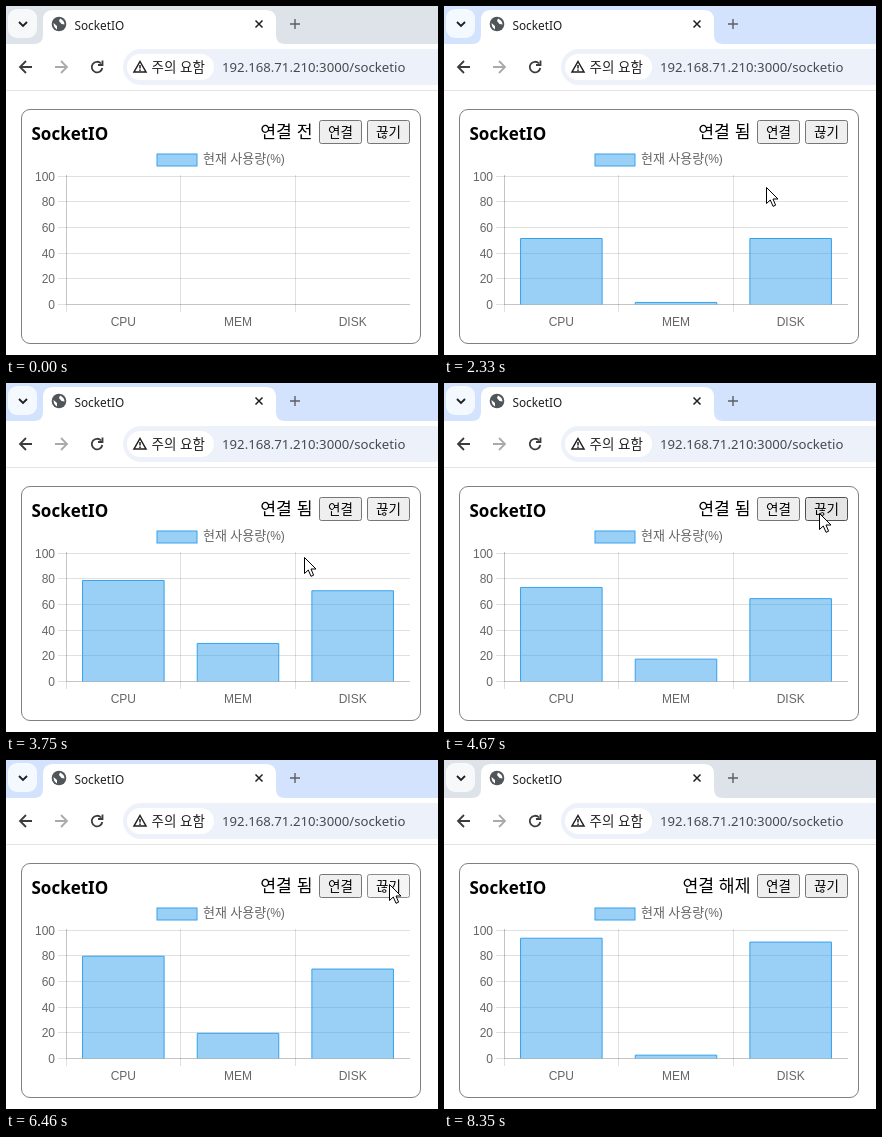
An HTML page that plays this animation: 432x349 px, repeating every 8450 ms.

```html
<!DOCTYPE html>
<html lang="ko">
<head>
<meta charset="utf-8">
<title>SocketIO</title>
<style>
html, body { margin: 0; width: 100%; height: 100%; overflow: hidden; background: #fff; }
svg { display: block; width: 100vw; height: 100vh; }
text { font-family: "Noto Sans", "Noto Sans CJK KR", sans-serif; }
.ko { font-family: "Noto Sans CJK KR", sans-serif; font-weight: 300; }
.chart text { font: 12px "Liberation Sans", "Noto Sans CJK KR", sans-serif; fill: #666; }
.chart .ko { font-size: 13px; }
.chart .tip text { fill: #fff; }
.icon { fill: none; stroke: #3c3c3c; stroke-width: 1.8; }
.blue { fill: rgba(54,162,235,.5); stroke: #36a2eb; }
.btn { fill: #efefef; stroke: #767676; }
.btn.hover { fill: #e5e5e5; stroke: #4f4f4f; }
.btn.down { fill: #f5f5f5; stroke: #8d8d8d; }
</style>
</head>
<body>
<svg viewBox="0 0 432 349">
  <!-- tab strip -->
  <rect id="strip" width="432" height="38"/>
  <rect x="2" y="3" width="29" height="29" rx="9" fill="#fff" opacity=".75"/>
  <path class="icon" d="M13 16l4 4 4-4" style="stroke:#1f1f1f"/>
  <path d="M28 38q9 0 9-9V14q0-10 10-10H260q10 0 10 10V29q0 9 9 9z" fill="#fff"/>
  <circle cx="53" cy="18" r="7.3" fill="#50555a"/>
  <path d="M47.500 17l3.500 3v3.500q-3.500-2-3.500-6.500zM54 12.500l-1 2.500 2.500 3 3 .5q0-4-4.500-6z" fill="#fff"/>
  <text x="68.500" y="23.500" font-size="11.8" fill="#1f1f1f">SocketIO</text>
  <path class="icon" d="M249.500 14.500l7 7m0-7l-7 7" style="stroke:#1f1f1f;stroke-width:1.5"/>
  <path class="icon" d="M284 18h10m-5-5v10" style="stroke:#5c5f62;stroke-width:1.4"/>

  <!-- toolbar -->
  <path class="icon" d="M26 61H14m6-6l-6 6 6 6"/>
  <path class="icon" d="M49 61H61m-6-6l6 6-6 6" style="stroke:#aaa"/>
  <path class="icon" d="M95 57.500a5.300 5.300 0 1 0 1.300 4.500M96.500 54.500v4.500h-4.500"/>
  <rect x="117" y="43" width="340" height="36" rx="18" fill="#edf1f9"/>
  <rect x="121" y="48" width="87" height="26" rx="13" fill="#fff"/>
  <path class="icon" d="M134 55.500l6 10.500h-12zM134 59v3.500m0 1v1.500" style="stroke:#1f1f1f;stroke-width:1.5"/>
  <text class="ko" x="145.500" y="65.500" font-size="13.5" fill="#1f1f1f">주의 요함</text>
  <text x="216" y="66" font-size="13.2" fill="#474a4e">192.168.71.210:3000/socketio</text>
  <path d="M0 84.500H432" stroke="#e4e4e4"/>

  <!-- card -->
  <rect x="15.500" y="103.500" width="399" height="234" rx="8.500" fill="#fff" stroke="#808080"/>
  <text x="25.500" y="133.500" font-size="17" font-weight="700">SocketIO</text>
  <text class="ko" id="status" x="306.500" y="132" font-size="17.2" text-anchor="end"></text>
  <rect class="btn" x="313.500" y="114.500" width="42" height="23" rx="2"/>
  <rect class="btn" x="361.500" y="114.500" width="42" height="23" rx="2"/>
  <g font-size="13.5" text-anchor="middle">
    <text class="ko" x="334.500" y="131">연결</text>
    <text class="ko" x="382.500" y="131">끊기</text>
  </g>

  <g class="chart">
    <rect class="blue" x="151" y="148" width="40" height="12"/>
    <text x="197" y="157"><tspan class="ko">현재</tspan> <tspan class="ko">사용량</tspan>(%)</text>
    <g id="grid"></g>
    <g id="bars"></g>
    <g class="tip" id="tip">
      <path d="M217 158H334q6 0 6 6V176l5.500 5.500-5.500 5.500V199q0 6-6 6H217q-6 0-6-6V164q0-6 6-6z" fill="rgba(0,0,0,.8)"/>
      <text x="217.500" y="175" style="font-weight:700">DISK</text>
      <rect x="217.500" y="185.500" width="12" height="12" fill="#9bd0f5" stroke="#36a2eb"/>
      <text x="232" y="195"><tspan class="ko">현재</tspan> <tspan class="ko">사용량</tspan>(%): 91</text>
    </g>
  </g>
  <path id="cursor" d="M.5.5V16.500L4.300 13 7 19.300 9.600 18.200 7 12H12z" fill="#fff" stroke="#000"/>
</svg>
<script>
const LOOP = 8450, FIRST = 1860, PERIOD = 670;
const LEFT = 60, RIGHT = 404, BASE = 298.5, UNIT = 1.285;
const SLOT = (RIGHT - LEFT) / 3, BAR = SLOT * .72;
const $ = id => document.getElementById(id);
const clamp = v => Math.max(0, Math.min(1, v));
const mix = (a, b, p) => a + (b - a) * p;
const within = (t, a, b) => t >= a && t < b;
const buttons = [...document.querySelectorAll('.btn')];

// successive readings of each bar
const usage = {
  CPU: [52, 88, 79, 80, 70, 72, 80, 94],
  MEM: [2, 25, 30, 5, 25, 10, 20, 3],
  DISK: [52, 75, 71, 70, 62, 57, 70, 91]
};
const names = Object.keys(usage);

// time, x, y where the pointer rests or turns
const path = [
  [40, 405, 350], [650, 329, 121], [1860, 326, 125], [2330, 322, 181],
  [3700, 297, 175], [4400, 373, 131], [5540, 386, 123], [6700, 383, 124],
  [7380, 366, 245], [7900, 386, 350]
];

function drawGrid() {
  let lines = '', labels = '';
  for (let v = 0; v <= 100; v += 20) {
    const y = Math.floor(BASE - v * UNIT) + .5;
    lines += `M52 ${y}H${RIGHT}`;
    labels += `<text x="49" y="${y + 4}" text-anchor="end">${v}</text>`;
  }
  names.forEach((name, i) => {
    const x = LEFT + i * SLOT;
    lines += `M${Math.floor(x) + .5} 169V306`;
    labels += `<text x="${x + SLOT / 2}" y="320" text-anchor="middle">${name}</text>`;
  });
  $('grid').innerHTML = `<path d="${lines}M60.5 169V298M60 298.5H404" fill="none" stroke="rgba(0,0,0,.12)"/>${labels}`;
  $('bars').innerHTML = '<path class="blue"/>'.repeat(names.length);
}

function pointer(t) {
  const next = path.findIndex(k => k[0] > t);
  const b = path.at(next), a = path[Math.max(0, next < 0 ? path.length - 1 : next - 1)];
  const p = clamp((t - a[0]) / (b[0] - a[0] || 1)), e = p * p * (3 - 2 * p);
  return [mix(a[1], b[1], e), mix(a[2], b[2], e)];
}

function reading(list, t) {
  const n = Math.min(list.length - 1, Math.floor((t - FIRST) / PERIOD));
  if (n < 0) return 0;
  const p = clamp((t - FIRST - n * PERIOD + 20) / PERIOD);
  return mix(n ? list[n - 1] : 0, list[n], 1 - (1 - p) ** 4);
}

function draw(t) {
  $('strip').setAttribute('fill', within(t, 1310, 8350) ? '#d3e3fd' : '#dde3e9');
  $('status').textContent = t < 1510 ? '연결 전' : t < 6600 ? '연결 됨' : '연결 해제';

  const [x, y] = pointer(t).map(Math.round);
  $('cursor').setAttribute('transform', `translate(${x} ${y})`);
  buttons.forEach((b, i) => {
    const left = 313 + i * 48;
    const down = i ? within(t, 6450, 6600) : within(t, 1360, 1510);
    const hover = within(x, left, left + 43) && within(y, 114, 138);
    b.setAttribute('class', 'btn' + (down ? ' down' : hover ? ' hover' : ''));
  });

  const shown = clamp((t - 7250) / 150) * clamp((8100 - t) / 200);
  $('tip').setAttribute('opacity', shown);
  const bars = $('bars').children;
  names.forEach((name, i) => {
    const v = reading(usage[name], t);
    const barX = LEFT + (i + .5) * SLOT - BAR / 2 + .5;
    bars[i].setAttribute('visibility', v > 0 ? 'visible' : 'hidden');
    bars[i].setAttribute('d', `M${barX} ${BASE}V${BASE - v * UNIT + .5}h${BAR - 1}V${BASE}`);
  });
  const tone = (a, b) => a.map((c, i) => Math.round(mix(c, b[i], shown))).join();
  bars[2].style.fill = `rgba(${tone([54, 162, 235], [8, 154, 255])},.5)`;
  bars[2].style.stroke = `rgb(${tone([54, 162, 235], [12, 129, 206])})`;
}

function frame() {
  draw(performance.now() % LOOP);
  requestAnimationFrame(frame);
}
drawGrid();
frame();
</script>
</body>
</html>
```
